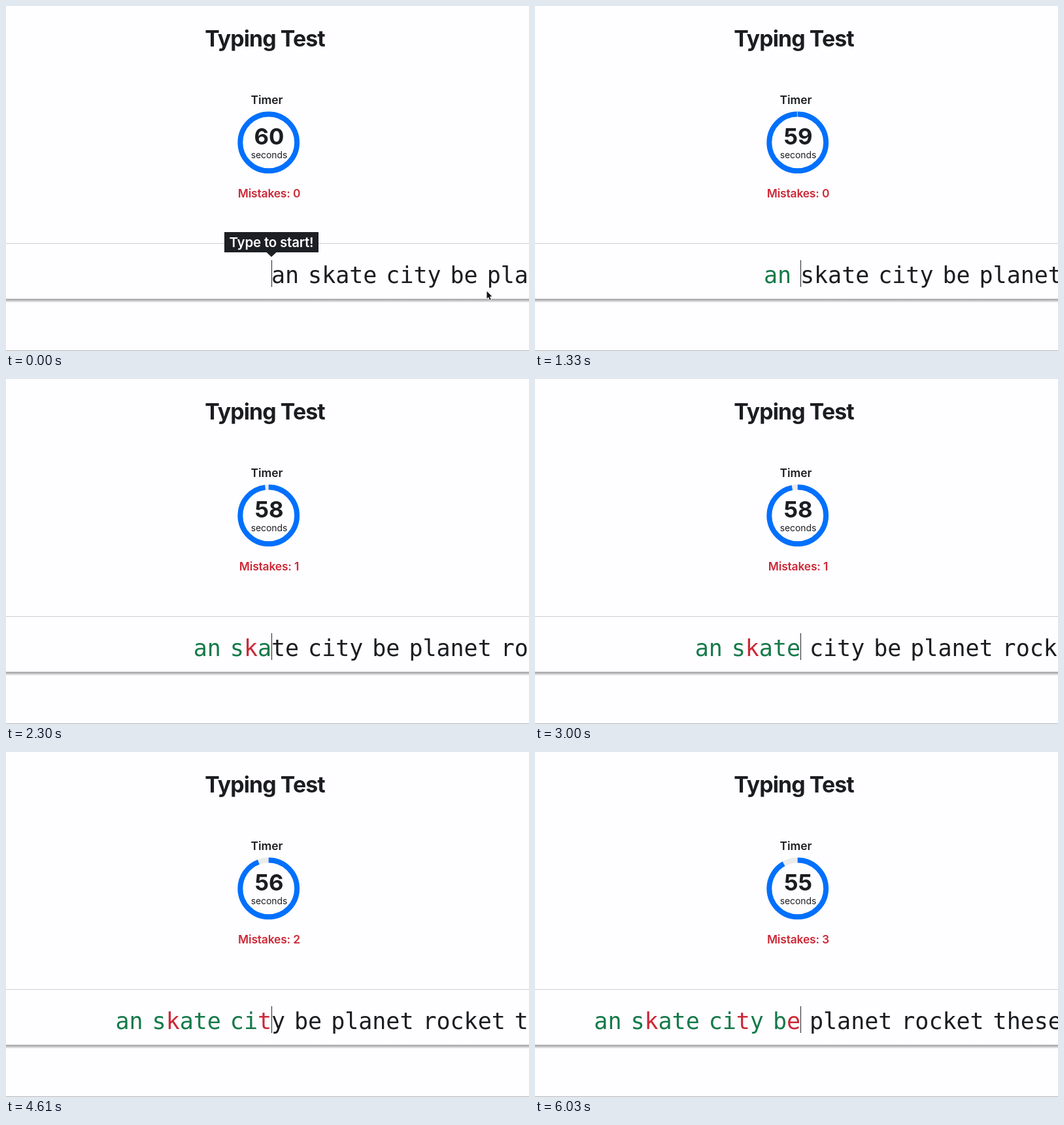
Animation, 800 px wide and 528 px high, one loop 6060 ms. Source, as an HTML page with a canvas:

```html
<!DOCTYPE html>
<html lang="en">
<head>
<meta charset="utf-8">
<title>Typing Test</title>
<style>
  html, body { margin: 0; width: 100%; height: 100%; overflow: hidden; background: #fefdff; }
  canvas { display: block; width: 800px; height: 528px; }
</style>
</head>
<body>
<canvas id="stage"></canvas>
<script>
const W = 800, H = 528, LOOP = 6060;
const BG = '#fefdff', INK = '#1b1d20', BLUE = '#0070fd', TRACK = '#ebebec';
const GREEN = '#147a49', RED = '#cc2936', TIP = '#1c1f24';
const SANS = 'Inter, Roboto, sans-serif';
const MONO = '"DejaVu Sans Mono", "Liberation Mono", monospace';

const TEXT = 'an skate city be planet rocket these';
// Time of each key press in ms, and the positions typed wrongly
const KEYS = [150, 460, 900, 1500, 1750, 2080, 2400, 2750,
              3060, 3450, 3830, 4150, 4680, 5100, 5400, 5820];
const WRONG = [4, 11, 15];
const FIRST_TICK = 1150;
const CARET_X = 406, LETTER = 21.05, SPACE = 14;

const canvas = document.getElementById('stage');
const ctx = canvas.getContext('2d');
const dpr = window.devicePixelRatio || 1;
canvas.width = W * dpr;
canvas.height = H * dpr;
ctx.scale(dpr, dpr);

function label(text, x, y, weight, size, color, spacing = 0) {
  ctx.font = `${weight} ${size}px ${SANS}`;
  ctx.letterSpacing = spacing + 'px';
  ctx.textAlign = 'center';
  ctx.fillStyle = color;
  ctx.fillText(text, x, y);
  ctx.letterSpacing = '0px';
}

function rect(x, y, w, h, color) {
  ctx.fillStyle = color;
  ctx.fillRect(x, y, w, h);
}

function polygon(points) {
  ctx.beginPath();
  points.forEach(([x, y]) => ctx.lineTo(x, y));
  ctx.closePath();
}

function arc(from, to, color) {
  ctx.beginPath();
  ctx.arc(401.7, 208.9, 43.4, from - Math.PI / 2, to - Math.PI / 2);
  ctx.strokeStyle = color;
  ctx.lineWidth = 7.9;
  ctx.stroke();
}

function drawTimer(t) {
  const elapsed = Math.max(0, t - FIRST_TICK) / 1000;
  const seconds = t < FIRST_TICK ? 60 : 59 - Math.floor(elapsed);
  const full = Math.PI * 2;
  label('Timer', 399, 150, 600, 17.4, INK);
  arc(0, full, elapsed > 0 ? TRACK : BLUE);
  if (elapsed > 0) arc(0, full * (1 - elapsed / 60), BLUE);
  label(seconds, 402.5, 211.6, 700, 34.7, INK);
  label('seconds', 402.5, 232.5, 400, 13.9, INK);
}

function drawPanel() {
  rect(0, 363, W, 1, '#cfced0');
  const shade = ctx.createLinearGradient(0, 448, 0, 454);
  shade.addColorStop(0, '#a9a9ab');
  shade.addColorStop(0.35, '#b4b4b6');
  shade.addColorStop(1, BG);
  rect(0, 448, W, 6, shade);
  rect(0, 527, W, 1, '#b5b5b7');
}

const advance = ch => ch === ' ' ? SPACE : LETTER;

function drawWords(typed) {
  let x = CARET_X;
  for (let i = 0; i < typed; i++) x -= advance(TEXT[i]);
  ctx.font = `35px ${MONO}`;
  ctx.textAlign = 'left';
  [...TEXT].forEach((ch, i) => {
    ctx.fillStyle = i >= typed ? INK : WRONG.includes(i) ? RED : GREEN;
    ctx.fillText(ch, x, 424.3);
    x += advance(ch);
  });
  rect(CARET_X, 389, 1, 41, '#222428');
}

function drawHint() {
  rect(334, 346, 144, 31, TIP);
  polygon([[398.5, 377], [413.5, 377], [406, 384]]);
  ctx.fill();
  label('Type to start!', 406, 369.2, 600, 20.5, '#fff', -0.2);
}

function drawPointer() {
  ctx.save();
  ctx.translate(735.5, 436.5);
  polygon([[0, 0], [0, 11.2], [2.6, 8.9], [4.5, 13.4], [6.3, 12.6], [4.4, 8.2], [7.9, 8]]);
  ctx.lineJoin = 'round';
  ctx.lineWidth = 1.6;
  ctx.strokeStyle = '#fff';
  ctx.stroke();
  ctx.fillStyle = '#111';
  ctx.fill();
  ctx.restore();
}

function draw(t) {
  const typed = KEYS.filter(k => k <= t).length;
  const mistakes = WRONG.filter(i => i < typed).length;
  rect(0, 0, W, H, BG);
  label('Typing Test', 396, 62.2, 700, 33.8, INK, -0.85);
  drawTimer(t);
  label('Mistakes: ' + mistakes, 402.5, 293.2, 600, 17.4, RED, -0.15);
  drawPanel();
  drawWords(typed);
  if (!typed) {
    drawHint();
    drawPointer();
  }
}

const start = performance.now();
function frame() {
  draw((performance.now() - start) % LOOP);
  requestAnimationFrame(frame);
}
frame();
</script>
</body>
</html>
```
